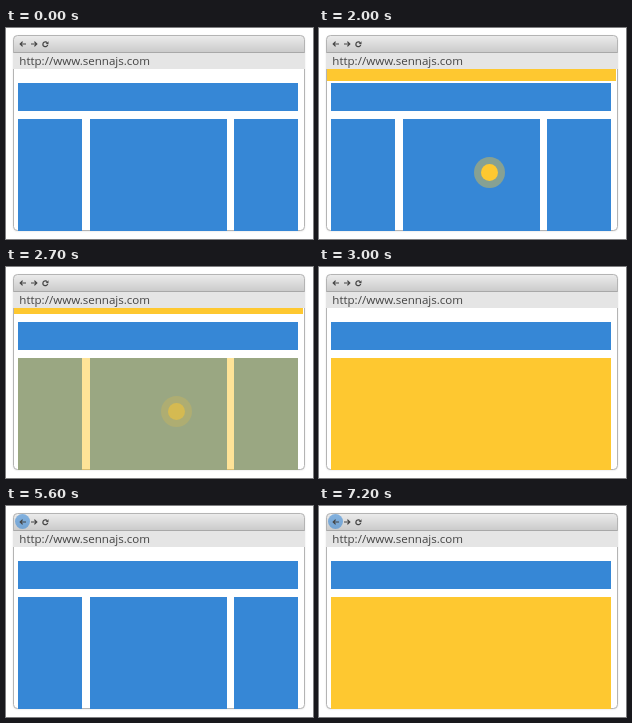
An HTML page with a canvas that plays this animation: 307x211 px, repeating every 8200 ms.

```html
<!DOCTYPE html>
<html lang="en">
<head>
<meta charset="utf-8">
<title>Single page navigation</title>
<style>
  html, body { margin: 0; width: 100%; height: 100%; overflow: hidden; background: #fff; }
  canvas { display: block; width: 307px; height: 211px; }
</style>
</head>
<body>
<canvas id="stage"></canvas>
<script>
const W = 307, H = 211, LOOP = 8200, STEP = 100;
const BLUE = '#3687d6', YELLOW = '#fec830', INK = '#444';
const canvas = document.getElementById('stage');
const ctx = canvas.getContext('2d');
const ratio = window.devicePixelRatio || 1;
canvas.width = Math.round(W * ratio);
canvas.height = Math.round(H * ratio);
ctx.scale(ratio, ratio);

// Progress from 0 to 1 in `count` hard steps; the first step lands at `start`.
function steps(t, start, count) {
  const done = Math.floor((t - start) / STEP) + 1;
  return Math.min(1, Math.max(0, done / count));
}

function rect(x1, y1, x2, y2, color, alpha = 1) {
  ctx.globalAlpha = alpha;
  ctx.fillStyle = color;
  ctx.fillRect(x1, y1, x2 - x1, y2 - y1);
  ctx.globalAlpha = 1;
}

function disc(x, y, r, color, alpha = 1) {
  if (r <= 0 || alpha <= 0) return;
  ctx.globalAlpha = alpha;
  ctx.fillStyle = color;
  ctx.beginPath();
  ctx.arc(x, y, r, 0, Math.PI * 2);
  ctx.fill();
  ctx.globalAlpha = 1;
}

function roundedPath(x, y, w, h, r) {
  ctx.beginPath();
  ctx.moveTo(x + r, y);
  ctx.arcTo(x + w, y, x + w, y + h, r);
  ctx.arcTo(x + w, y + h, x, y + h, r);
  ctx.arcTo(x, y + h, x, y, r);
  ctx.arcTo(x, y, x + w, y, r);
  ctx.closePath();
}

function arrow(x, y, dir) {
  ctx.beginPath();
  ctx.moveTo(x - 3 * dir, y);
  ctx.lineTo(x + 2.6 * dir, y);
  ctx.moveTo(x + 0.4 * dir, y - 2.4);
  ctx.lineTo(x + 2.8 * dir, y);
  ctx.lineTo(x + 0.4 * dir, y + 2.4);
  ctx.stroke();
}

function reloadIcon(x, y) {
  ctx.beginPath();
  ctx.arc(x, y, 2.4, 0.2, Math.PI * 1.75);
  ctx.stroke();
  ctx.fillStyle = INK;
  ctx.beginPath();
  ctx.moveTo(x + 3.2, y - 3);
  ctx.lineTo(x + 3.2, y);
  ctx.lineTo(x + 0.4, y - 0.3);
  ctx.fill();
}

function drawWindow() {
  rect(0, 0, W, H, '#fff');
  roundedPath(7.5, 7.5, 291, 195, 4);
  ctx.save();
  ctx.shadowColor = 'rgba(0,0,0,0.18)';
  ctx.shadowBlur = 2 * ratio;
  ctx.shadowOffsetY = 0.5 * ratio;
  ctx.fillStyle = '#fff';
  ctx.fill();
  ctx.restore();

  ctx.save();
  ctx.clip();
  const shade = ctx.createLinearGradient(0, 8, 0, 24);
  shade.addColorStop(0, '#ebebeb');
  shade.addColorStop(1, '#cbcbcb');
  rect(7, 7, 299, 24, shade);
  rect(7, 24, 299, 25, '#a8a8a8');
  ctx.restore();

  roundedPath(7.5, 7.5, 291, 195, 4);
  ctx.strokeStyle = '#b4b4b4';
  ctx.lineWidth = 1;
  ctx.stroke();

  rect(7, 25, 299, 41, '#e5e5e5');
  ctx.fillStyle = INK;
  ctx.font = '11.55px "Open Sans", "Noto Sans", sans-serif';
  ctx.textBaseline = 'alphabetic';
  ctx.fillText('http://www.sennajs.com', 13.3, 37);
}

function drawToolbar(t) {
  const press = steps(t, 5000, 3);
  const settle = steps(t, 5400, 3);
  if (press > 0) disc(16.5, 15.5, 3 + 4.5 * press, BLUE, 0.5 + 0.08 * settle);
  ctx.strokeStyle = INK;
  ctx.lineWidth = 1.2;
  arrow(17, 16, -1);
  arrow(28, 16, 1);
  reloadIcon(39.3, 16.3);
}

function drawPointer(t) {
  let dot, halo, alpha = 1;
  if (t < 5000) {
    dot = steps(t, 500, 4);
    halo = steps(t, 900, 4);
    alpha = 1 - steps(t, 2500, 6);
  } else {
    dot = t >= 6600 ? 1 : 0;
    halo = steps(t, 6700, 4);
  }
  if (halo > 0) disc(170.5, 144.5, 8.5 + 7 * halo, YELLOW, 0.4 * alpha);
  disc(170.5, 144.5, 8.5 * dot, YELLOW, alpha);
}

function drawPage(t) {
  rect(12, 55, 292, 83, BLUE);
  for (const [left, right] of [[12, 76], [84, 221], [228, 292]]) {
    rect(left, 91, right, 203, BLUE);
  }
  drawPointer(t);
  const cover = t >= 7200 ? 1 : steps(t, 2500, 6) - steps(t, 5400, 3);
  if (cover > 0) rect(12, 91, 292, 203, YELLOW, cover);
}

function drawProgress(t) {
  const loaded = (steps(t, 1400, 4) * 4 + steps(t, 1900, 2) * 2) / 6;
  const height = 12 * (1 - steps(t, 2500, 6));
  if (loaded > 0 && height > 0) rect(8, 41, 8 + 289 * loaded, 41 + height, YELLOW);
}

function draw(t) {
  drawWindow();
  drawToolbar(t);
  drawPage(t);
  drawProgress(t);
}

const origin = performance.now();
function tick() {
  draw((performance.now() - origin) % LOOP);
  requestAnimationFrame(tick);
}
tick();
</script>
</body>
</html>
```
